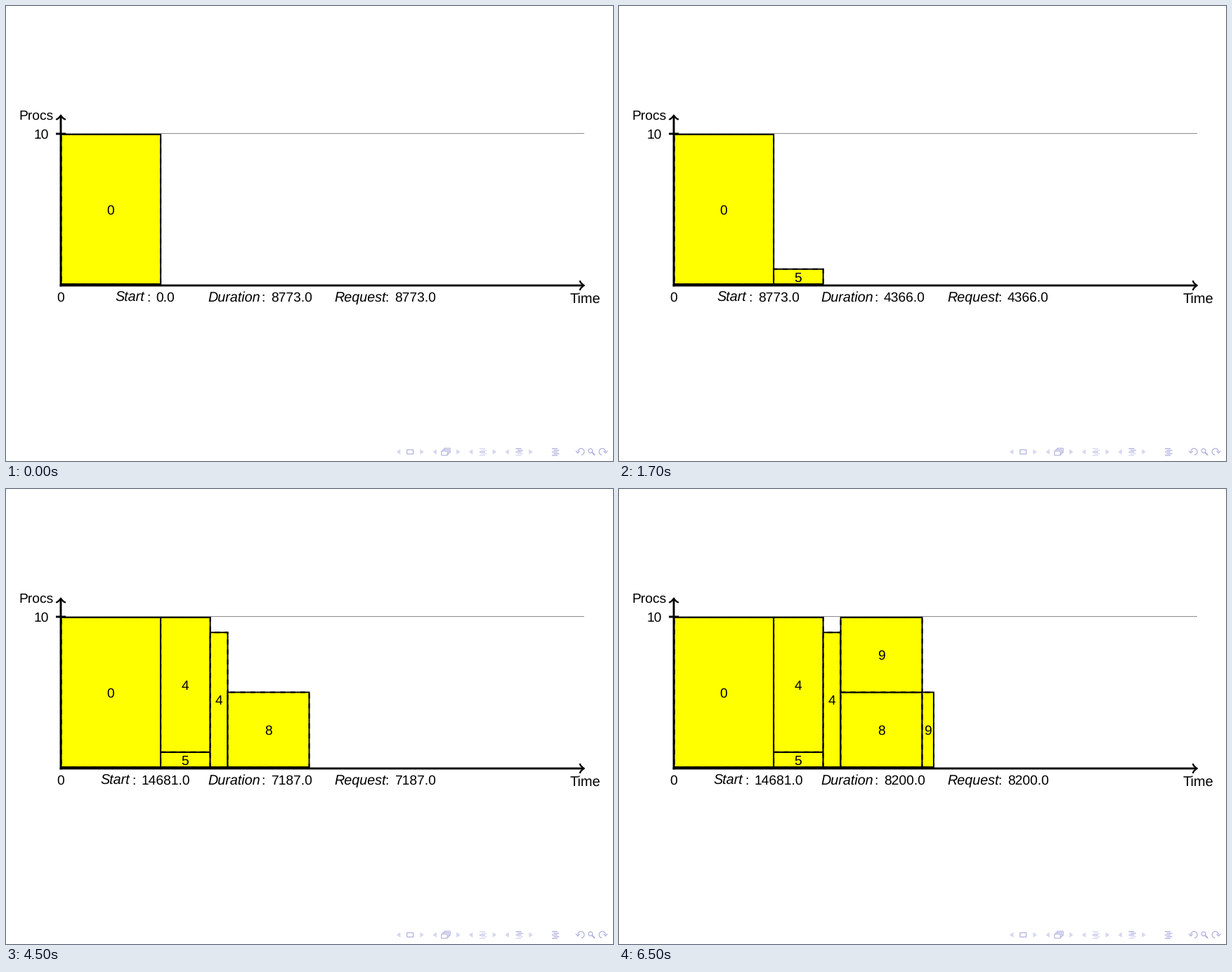
A matplotlib script for the animation above (8 s loop, 864 px wide and 648 px high).

```python
import numpy as np
import matplotlib.pyplot as plt
from matplotlib.animation import FuncAnimation
from matplotlib.patches import Circle, PathPatch, Polygon, Rectangle
from matplotlib.path import Path

W, H, DPI = 864, 648, 72          # at 72 dpi one point is one pixel
FRAMES, INTERVAL = 16, 500
X0, Y0 = 78.6, 396.0              # chart origin
X_SCALE, Y_SCALE = 0.01614, 21.3  # pixels per time unit and per processor
EDGE, AXIS = 1.9, 2.9
DARK, PALE = "#adade0", "#d6d6f0"

plt.rcParams.update({"font.family": "Liberation Sans", "path.snap": False,
                     "text.hinting": "none"})
fig = plt.figure(figsize=(W / DPI, H / DPI), dpi=DPI, facecolor="white")
ax = fig.add_axes([0, 0, 1, 1])
ax.set(xlim=(0, W), ylim=(H, 0))
ax.axis("off")

# label, first step, start, end, lowest processor, highest processor
JOBS = [
    ("0", 0, 0, 8773, 0, 10),
    ("5", 1, 8773, 13139, 0, 1),
    ("4", 2, 8773, 13139, 1, 10),
    ("4", 2, 13139, 14681, 0, 9),
    ("8", 3, 14681, 21868, 0, 5),
    ("9", 4, 14681, 21868, 5, 10),
    ("9", 4, 21868, 22881, 0, 5),
]
# start and duration of the job placed at each step
STEPS = [(0, 8773), (8773, 4366), (8773, 5908), (14681, 7187), (14681, 8200)]


def text(x, y, s, ha="left", style="normal", size=19.3):
    return ax.text(x, y, s, ha=ha, va="baseline", style=style, size=size, zorder=6)


def line(xs, ys, color="black", lw=1.0, z=2):
    ax.plot(xs, ys, color=color, lw=lw, solid_capstyle="butt", zorder=z)


def box(x, y, w, h, **style):
    return ax.add_patch(Rectangle((x, y), w, h, **style))


def arrow_head(x, y, angle):
    pts = 1.52 * np.array([(-3, -4), (-2.75, -2.5), (0, -0.25), (0.75, 0),
                           (0, 0.25), (-2.75, 2.5), (-3, 4)])
    c, s = np.cos(angle), np.sin(angle)
    pts = pts @ np.array([[c, s], [-s, c]]) + (x, y)
    codes = [Path.MOVETO] + [Path.CURVE4] * 6
    ax.add_patch(PathPatch(Path(pts, codes), fc="none", ec="black", lw=2.3,
                           capstyle="round", joinstyle="round", zorder=2))


def draw_axes():
    line([78, 823], [181.6, 181.6], "#808080", 0.95, 1)
    line([76.6, 822], [398, 398], lw=AXIS)
    line([78, 78], [399.4, 156.6], lw=AXIS)
    line([71, 85.2], [182, 182], lw=AXIS)
    arrow_head(821.7, 398, 0)
    arrow_head(78, 156.8, -np.pi / 2)
    text(43.5, 162, "Procs", "center")
    text(50, 189, "10", "center")
    text(78, 421, "0", "center")
    text(824, 422.5, "Time", "center", size=20)


def draw_job(label, start, end, low, high):
    # outlines run from the bottom left corner, along the base, then up
    x, y = X0 + start * X_SCALE, Y0 - low * Y_SCALE
    w, h = (end - start) * X_SCALE, (low - high) * Y_SCALE
    fill = box(x, y, w, h, fc="yellow", ec="black", lw=EDGE, zorder=3)
    dashes = box(x, y, w, h, fc="none", ec="black", lw=EDGE, zorder=3,
                 ls=(0, (3.75, 3.75)))
    return fill, dashes, text(x + w / 2 - 0.4, y + h / 2 + 7, label, "center")


def draw_field(x, width, name):
    """Italic name, its colon and the value, which is set per step."""
    return [text(x, 421, name, style="italic", size=19.8),
            text(x + width, 421, ":"),
            text(x + width + 13.5, 421, "")]


def triangle(x, side):
    ax.add_patch(Polygon([(x + 2.8 * side, 635), (x - 2.6 * side, 631.2),
                          (x - 2.6 * side, 638.8)], fc=PALE, ec="none"))


def text_lines(x, colors):
    for i, color in enumerate(colors):
        indent = 2.4 if i in (1, 3) else 0
        y = 630.4 + 2.4 * i
        line([x - 5 + indent, x + 3 + indent], [y, y], color, 1.25)


def turn_arrow(x, side):
    a = np.radians(np.linspace(-180, 85, 40))
    line(x + side * 4.6 * np.cos(a), 634.8 + 4.6 * np.sin(a), DARK, 1.2)
    tip = x - side * 4.6
    line([tip - 2.8, tip, tip + 2.8], [633.6, 636.8, 633.6], DARK, 1.2)


def draw_navigation():
    for left, right in [(558.7, 592), (610.2, 643.8), (661.7, 695.3), (713.2, 747)]:
        triangle(left, -1)
        triangle(right, 1)
    box(570.8, 632, 8.8, 6, fc="none", ec=DARK, lw=1.2)
    for i, z in ((2, 1), (1, 2), (0, 3)):
        box(619.8 + 2 * i, 633.9 - 2 * i, 8.4, 6, fc="white", ec=DARK, lw=1.1, zorder=z)
    text_lines(679, [PALE, PALE, DARK, PALE, PALE])
    text_lines(730.5, [DARK, DARK, DARK, PALE, PALE])
    text_lines(782, [DARK] * 5)
    turn_arrow(818.5, 1)
    turn_arrow(848.8, -1)
    ax.add_patch(Circle((832, 633.5), 2.9, fc="none", ec=DARK, lw=1.2))
    line([834.2, 838.2], [635.7, 639.7], DARK, 1.9)


draw_axes()
draw_navigation()
jobs = [(step, draw_job(label, *extent)) for label, step, *extent in JOBS]
start_field = draw_field(155, 45, "Start")
start_offsets = [artist.get_position()[0] for artist in start_field]
duration_field = draw_field(287, 76.5, "Duration")
request_field = draw_field(467.5, 72, "Request")


def update(n):
    step = (n + 3) // 4
    for first, artists in jobs:
        for artist in artists:
            artist.set_visible(step >= first)

    start, duration = STEPS[step]
    value = f"{start:.1f}"
    shift = 5.2 * (len(value) - 3)   # keeps the field centred
    for artist, x in zip(start_field, start_offsets):
        artist.set_x(x - shift)
    start_field[2].set_text(value)
    for field in (duration_field, request_field):
        field[2].set_text(f"{duration:.1f}")
    return []


anim = FuncAnimation(fig, update, frames=FRAMES, interval=INTERVAL,
                     init_func=lambda: update(0), repeat=True, repeat_delay=0)
plt.show()
```
